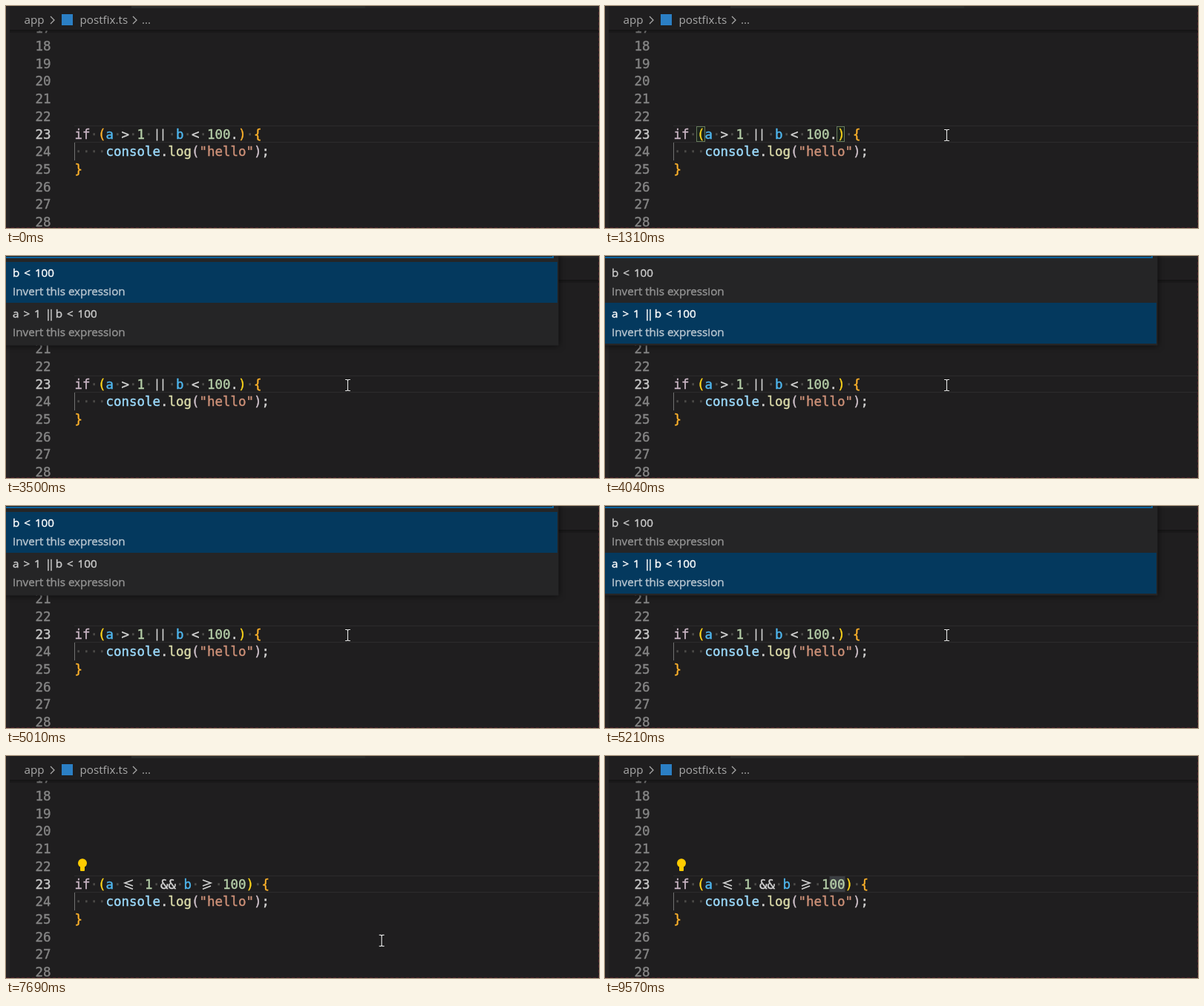
Animation of 799x299 px, one loop 9.64 s. Source, as an HTML page:

```html
<!DOCTYPE html>
<html lang="en">
<head>
<meta charset="utf-8">
<title>Postfix editor</title>
<style>
  html, body { margin: 0; width: 100%; height: 100%; overflow: hidden; background: #1f1e1f; }
  svg { display: block; width: 799px; height: 299px; }
  text { white-space: pre; }
  .mono { font: 17.44px "DejaVu Sans Mono", monospace; }
  .small { font-size: 14.7px; }
  .ui { font: 15.2px "Open Sans", sans-serif; }
  .label { word-spacing: 2px; }
  .bars { letter-spacing: -4.3px; }
  .strong { stroke-width: 0.4; }
  .match { fill: #18a3ff; font-weight: bold; }
  .end { text-anchor: end; }
  .hidden { display: none; }
  #pick { filter: drop-shadow(0 0 4px #000a); }
</style>
</head>
<body>
<svg id="stage" viewBox="0 0 799 299"></svg>
<script>
const LOOP = 9640, CELL = 10.5, LEFT = 92.5, ROW = 23.7, BASE = 179;
const COLORS = {
  k: '#cbb7c6', d: '#4d4c4a', y: '#ffd71a', o: '#ffb32b', v: '#4fb8f0', l: '#9cdcfe',
  w: '#d4d4d4', n: '#b5cea8', f: '#dcdcaa', s: '#ce9178', p: '#d0c2cc'
};
const stage = document.getElementById('stage');
const colX = col => LEFT + col * CELL;
const rowY = n => Math.floor(BASE + (n - 23) * ROW);

function add(parent, tag, attrs = {}, content) {
  const el = document.createElementNS('http://www.w3.org/2000/svg', tag);
  for (const key in attrs) el.setAttribute(key, attrs[key]);
  if (content) el.textContent = content;
  return parent.appendChild(el);
}
const group = (parent = stage, attrs) => add(parent, 'g', attrs);
const rect = (parent, x, y, width, height, fill, more) =>
  add(parent, 'rect', { x, y, width, height, fill, ...more });
const path = (parent, d, stroke, width = 1.3, more) =>
  add(parent, 'path', { d, stroke, 'stroke-width': width, fill: 'none', ...more });
const text = (parent, x, y, content, fill, cls = 'mono', more) =>
  add(parent, 'text', { x, y, fill, class: cls, ...more }, content);
const strongText = (parent, x, y, content, color) =>
  text(parent, x, y, content, color, 'mono strong', { stroke: color });
const show = (el, on) => el.classList.toggle('hidden', !on);

// Operators that the editor font joins into one two-cell glyph.
const LIGATURES = {
  '||': x => `M${x + 6} 165.5v16m8 0v-16`,
  '<=': x => `M${x + 15.5} 167l-11 4 11 4m-11 0l11 4.3`,
  '>=': x => `M${x + 4.5} 167l11 4-11 4m11 0l-11 4.3`
};

// Tokens are separated by blanks; the first letter picks the colour.
function drawCode(parent, line, source) {
  let col = 0;
  for (const token of source.split(' ')) {
    const color = COLORS[token[0]], word = token.slice(1);
    if (LIGATURES[word]) path(parent, LIGATURES[word](colX(col)), color, 1.6);
    else strongText(parent, colX(col), rowY(line), word, color);
    col += word.length;
  }
}

// Window chrome and gutter
rect(stage, 0, 0, 799, 299, '#1f1e1f');
const gutter = group();
for (let n = 17; n <= 28; n++)
  strongText(gutter, 39.5, rowY(n), String(n), n === 23 ? '#c8c8c8' : '#858585');
rect(stage, 0, 0, 799, 32, '#1f1e1f');
rect(stage, 0, 32, 799, 1.5, '#151415');
rect(stage, 0, 33.5, 799, 2.5, '#0003');
rect(stage, 169, 0, 315, 3, '#2a2c2c');
rect(stage, 484, 0, 315, 3, '#252526');
rect(stage, 0, 0, 5, 299, '#252425');
text(stage, 24.5, 24, 'app', '#a9a9a9', 'ui');
rect(stage, 75, 11, 15, 15, '#2b7fc4');
text(stage, 99.5, 24, 'postfix.ts', '#a9a9a9', 'ui');
text(stage, 183, 24, '...', '#a9a9a9', 'ui');
for (const x of [60, 171]) path(stage, `M${x} 14l5 5-5 5`, '#a9a9a9');

// Editor
path(stage, 'M92 161.5H799M92 183.5H799', '#2c2b2c', 1);
path(stage, 'M92.5 184V208', '#707070', 1);
const selection = rect(stage, colX(20), 162, 2 * CELL, 21, '#3a3d41');
const boxAttrs = { stroke: '#667a5c', 'stroke-width': 1 };
const brackets = group();
rect(brackets, 123.5, 162.5, 11, 20, '#00640018', boxAttrs);
const closeBox = rect(brackets, 312.5, 162.5, 10, 20, '#00640018', boxAttrs);
const activeLine = group();
drawCode(stage, 24, 'd···· lconsole w. flog p( s"hello" p) w;');
drawCode(stage, 25, 'o}');

const wave = (x, width) =>
  `M${x} 182` + Array.from({ length: width / 3 | 0 }, (_, i) => `l3 ${i % 2 ? 2.4 : -2.4}`).join('');
const wordError = path(stage, wave(313, 32), '#f14c4c', 1.2);
const dotError = path(stage, wave(313, 10), '#f14c4c', 1.2);
const caret = rect(stage, 0, 162, 1.7, 21, '#c8c8c8');

const bulb = group(stage, { fill: '#ffcc00' });
add(bulb, 'circle', { cx: 103, cy: 144.3, r: 6 });
rect(bulb, 100, 148, 6, 7, '#ffcc00', { rx: 1 });

// Suggestion list
const ICONS = {
  snippet(parent, y) {
    path(parent, `M351 ${y + 7}v-14h15v14`, '#e8e8e8', 1.4);
    path(parent, `M351 ${y + 7}h15`, '#e8e8e8', 1.4, { 'stroke-dasharray': '2 1.5' });
  },
  variable(parent, y) {
    path(parent, `M353 ${y - 6}h-3v12h3M363 ${y - 6}h3v12h-3` +
      `M354 ${y}l5-3 4 2v3l-5 3-4-2zl4 2 5-3m-5 3v3`, '#75beff', 1.2);
  },
  method(parent, y) {
    path(parent, `M358 ${y - 8}l7 4v8l-7 4-7-4v-8zM351 ${y - 4}l7 4 7-4M358 ${y}v8`, '#b180d7');
  }
};
// Matched letters stand between asterisks.
const SUGGESTIONS = [
  ['snippet', '*not*', 'POSTFIX'],
  ['variable', '*Not*ification'],
  ['variable', '*No*deI*t*erator'],
  ['method', '*no*Conflic*t*', 'velpar'],
  ['method', '*no*Conflic*t*', 'trovik']
];
const suggest = group();
rect(suggest, 345.5, 184.5, 334, 130, '#252526', { stroke: '#454545' });
rect(suggest, 346, 185, 333, 24, '#04395e');
SUGGESTIONS.forEach(([icon, label, origin], i) => {
  const y = 197.3 + i * 23.9;
  ICONS[icon](suggest, y);
  const el = text(suggest, 373, y + 6.2, '', '#d4d4d4');
  label.split('*').forEach((part, j) => add(el, 'tspan', j % 2 ? { class: 'match' } : {}, part));
  if (origin) text(suggest, 665.5, y + 5.5, origin, i ? '#9a9a9a' : '#c4ccd4', 'mono small end');
});
const details = group();
rect(details, 679.5, 184.5, 130, 50, '#252526', { stroke: '#454545' });
rect(details, 686, 193, 60, 24, '#191919', { rx: 3 });
text(details, 693, 210.5, '!expr', '#d4d4d4', 'mono', { style: 'font-size:16px' });
text(details, 753, 210, '-', '#c4c4c4', 'ui');
text(details, 765, 210, '[multi', '#c4c4c4', 'ui', { 'font-style': 'italic' });

// Quick pick
const pick = group(stage, { id: 'pick' });
rect(pick, -8, -8, 752.5, 128.5, '#252526');
path(pick, 'M0 2H737V0', '#0b639e', 2);
const pickRows = ['b < 100', 'a > 1 || b < 100'].map((content, i) => {
  const top = 8 + i * 55;
  const back = rect(pick, 0, top, 743, 55, '#04395e');
  const label = text(pick, 9, top + 19.5, '', '', 'ui label strong');
  for (const part of content.split(/(\|\|)/))
    add(label, 'tspan', part === '||' ? { class: 'bars' } : {}, part);
  return { back, label, hint: text(pick, 9, top + 44.7, 'Invert this expression', '', 'ui strong') };
});
function paint(el, color) {
  el.setAttribute('fill', color);
  el.setAttribute('stroke', color);
}
function selectPick(index) {
  pickRows.forEach((row, i) => {
    const on = i === index;
    show(row.back, on);
    paint(row.label, on ? '#ffffff' : '#cccccc');
    paint(row.hint, on ? '#b9c6d0' : '#929292');
  });
}

const mouse = group();
for (const [color, width] of [['#111', 3], ['#e8e8e8', 1.2]])
  path(mouse, 'M-3.5 -7.5h2.5l1 1 1-1h2.5M0 -6.5v13M-3.5 7.5h2.5l1-1 1 1h2.5', color, width);
path(stage, 'M0 298.5H798.5V0', '#451d28', 1, { 'stroke-dasharray': '4 3' });

// Timeline: each table lists [start, value] steps.
const at = (steps, t) => steps.reduce((value, [start, next]) => (t >= start ? next : value), steps[0][1]);
const within = (t, from, to) => t >= from && t < to;
const TYPED = [[0, ''], [2060, 'n'], [2200, 'no'], [2290, 'not'], [3130, '']];
const PICKED = [[0, 0], [4040, 1], [5010, 0], [5210, 1]];
const CARET = [[0, 0], [690, 1], [1240, 0], [1800, 1], [2780, 0], [3130, 1], [3200, 0], [6090, 1],
  [6600, 0], [7130, 1], [7600, 0], [8090, 1], [8590, 0], [9070, 1], [9570, 0]];
const MOVES = [
  [30, 690, [421, 284], [318, 188]],
  [830, 1310, [318, 188], [460.5, 174]],
  [7570, 7790, [460.5, 174], [540, 304]]
];

function mousePoint(t) {
  let point = MOVES[0][2];
  for (const [from, to, a, b] of MOVES) {
    if (t < from) break;
    const u = Math.min(1, (t - from) / (to - from));
    const eased = u * u * (3 - 2 * u);
    point = a.map((value, i) => value + (b[i] - value) * eased);
  }
  return point;
}

function activeSource(t, typed) {
  if (t >= 6120) {
    const name = t < 6320 ? 'l' : 'v';
    return `kif d· y( ${name}a d· w<= d· n1 d· w&& d· ${name}b d· w>= d· n100 y) d· o{`;
  }
  const paren = t < 690 ? 'o' : 'y';
  const word = typed ? ` l${typed}` : '';
  return `kif d· ${paren}( va d· w> d· n1 d· w|| d· vb d· w< d· n100 w.${word} ${paren}) d· o{`;
}

let shownSource = '';
function render(t) {
  const typed = at(TYPED, t);
  const source = activeSource(t, typed);
  if (source !== shownSource) {
    activeLine.replaceChildren();
    drawCode(activeLine, 23, source);
    shownSource = source;
  }
  const caretX = colX(t >= 6120 ? 22 : 21 + typed.length);
  caret.setAttribute('x', caretX - 0.5);
  closeBox.setAttribute('x', caretX - 0.5);
  suggest.setAttribute('transform', `translate(${(typed.length - 3) * CELL})`);
  mouse.setAttribute('transform', `translate(${mousePoint(t).join()})`);
  selectPick(at(PICKED, t));

  show(caret, at(CARET, t));
  show(brackets, within(t, 690, 3130));
  show(suggest, within(t, 2120, 3130));
  show(details, within(t, 2350, 3130));
  show(wordError, within(t, 2850, 3130));
  show(dotError, within(t, 3130, 3500));
  show(pick, within(t, 3200, 6090));
  show(bulb, t >= 6320);
  show(selection, t >= 9570);
  show(mouse, within(t, 30, 7790));
}

const started = performance.now();
function tick() {
  render((performance.now() - started) % LOOP);
  requestAnimationFrame(tick);
}
tick();
</script>
</body>
</html>
```
